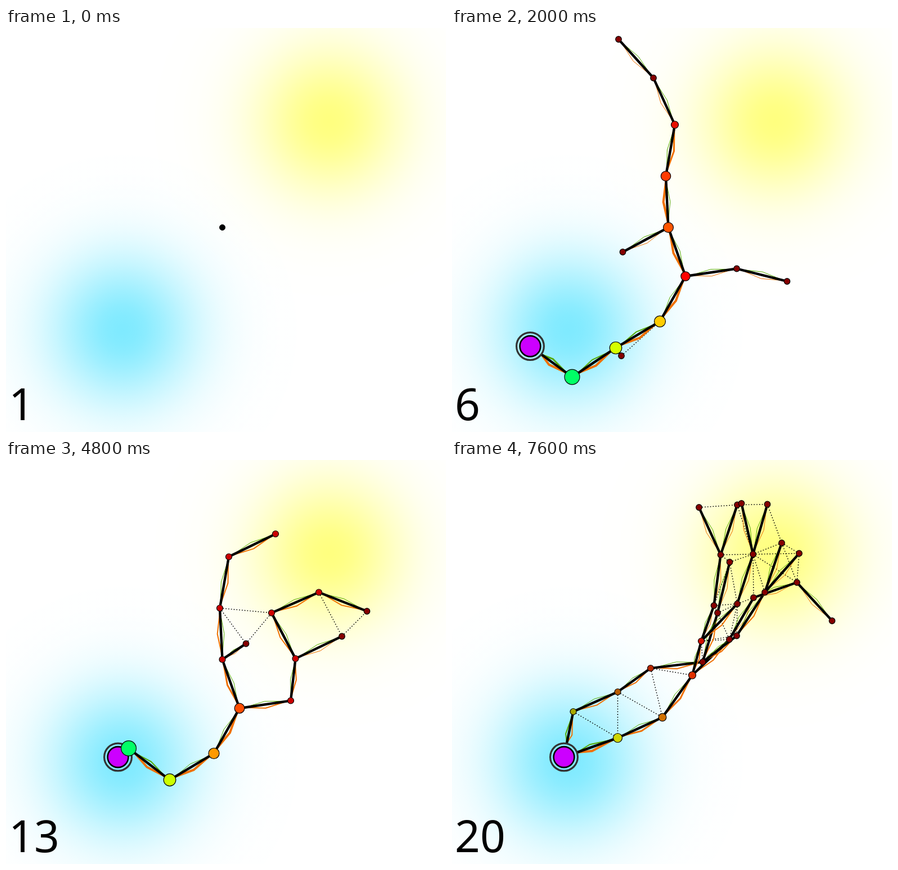
An HTML page with a canvas that plays this animation: 782x716 px, repeating every 8 s.

```html
<!DOCTYPE html>
<html lang="en">
<head>
<meta charset="utf-8">
<title>Growing network</title>
<style>
  html, body { margin: 0; width: 100%; height: 100%; overflow: hidden; background: #fff; }
  canvas { display: block; width: 782px; height: 716px; }
</style>
</head>
<body>
<canvas id="stage" width="782" height="716"></canvas>
<script>
const ctx = document.getElementById('stage').getContext('2d');
const STEP = 400;

const P = {
  a: [384.5, 353.5], b: [415, 440], c: [369.5, 520], d: [291, 567], e: [213.5, 618.5],
  f: [139, 564], g: [199, 526.5], h: [218, 511], i: [301, 581], j: [252, 651],
  k: [380, 262.5], l: [396, 171.5], m: [358, 88.5], n: [296, 20], o: [506, 426.5],
  p: [595.5, 449], q: [303.5, 397], r: [497.5, 400], s: [472, 271], t: [311, 138.5],
  u: [479, 131], v: [514.5, 352], w: [556, 234.5], x: [437, 236], y: [426.5, 325.5],
  z: [515.5, 316.5], A: [597, 312.5], B: [641.5, 268], C: [586, 147], D: [519, 48],
  E: [565, 97], F: [673, 182], H: [614, 59], N: [283, -14],
  G: [215.5, 446], I: [294.5, 411], J: [353, 369], K: [294.5, 492.5], L: [374, 456],
  M: [427, 381.5], O: [445.5, 358], P: [443, 321], Q: [493, 318], R: [506, 311.5],
  S: [465.5, 258], T: [507, 255], U: [536, 244], V: [613, 217], W: [675.5, 285],
  X: [617, 165.5], Y: [535, 167], Z: [493.5, 181],
  α: [477.5, 168], β: [439, 84], γ: [507, 79.5], δ: [514.5, 77], ε: [560.5, 78.5], ζ: [625, 13]
};

// A node style is a hue, or [hue, radius, lightness]; unlisted nodes are small and dark.
const DARK = [0, 5.3, 26], RED = [0, 5.5, 40];

// Links: two nodes, then the orange and green widths.
const base = { d: 72, c: 36, b: 18, h: 144 };
const arm = 'hd42 dc41 cb41 ba31';
const crown = arm + ' ak21 kl21 lu11 bo11 ov11 vA11 AB11 ay31 yx11 ys11 yz31 zw31 wC21';
const mesh = 'kx ks ky lx xs sw sz sv yv zv zA wA wB';
const fork = { ...base, a: [12, 8, 50], y: [5, 6, 43], z: RED, w: RED };
const ring = { ...base, o: RED, v: RED, s: RED, a: RED, k: RED, l: RED, w: RED, u: RED };
const loop = arm + ' ak21 kl21 lu21 bo21 ov21 vs21 sw21';
const bundle = 'gG22 GI21 IJ21 JO21 gK42 KL31 LM31 MP21 MQ21 OR21 Os21 PS11 PT21 sZ11 Sα11 ' +
  'QU11 Rw21 UV11 wC11 wX11 TY11 αβ11 αγ11 Yδ11 Yε11';
const web = 'GK IK IL JL JM PO PQ PR sS sT ST sQ QT TR SZ Zα ZY ZT αY βγ γε γY εC CY CX CV YX XV YU Yw YV TU';
const wide = {
  G: [60, 5.5, 33], I: [30, 5.5, 36], J: [13, 5.5, 36], K: [62, 8, 42],
  L: [32, 6.9, 41], M: [13, 6.5, 44], P: [5, 5.5, 41]
};

const step = (root, nodes, links = '', dots = '') =>
  ({ root, nodes, links: links.split(' ').filter(Boolean), dots: dots.split(' ').filter(Boolean) });

const steps = [
  step('', {}),
  step('b', { a: 144 }, 'ba33'),
  step('c', { b: 144, a: 68 }, 'cb43 ba32'),
  step('d', { c: 144, b: 68, a: 40, k: 16 }, 'dc43 cb42 ba41 ak31'),
  step('e', { d: 144, c: 68, b: 30, a: 20, k: 12, l: [3, 6.5, 45] },
    'ed43 dc42 cb41 ba41 ak41 kl21 lm11 bo11'),
  step('f', { e: 144, d: 70, c: 48, b: 0, a: 20, k: 14, l: [4, 6.5, 45] },
    'fe43 ed42 dc42 cb41 ba41 ak41 kl31 lm11 mn11 aq11 bo11 op11 di11', 'ic'),
  step('g', { e: 192, d: 128, c: 64, b: 16, a: 22, k: 14, l: RED },
    'ge43 ed43 dc42 cb41 ba41 ak41 kl21 lm11 mn11 bo11 op11 ej11', 'jd'),
  step('g', { e: 192, d: 128, c: 62, b: 32, a: 22, k: 14, s: RED },
    'ge43 ed43 dc42 cb41 ba41 ak41 kl21 lm11 mn11 lt11 ks21 br11 bo11 op11 ej11', 'nN tm ro jd'),
  step('g', { e: 192, d: 128, c: 62, b: 32, a: 22, k: 14, s: RED },
    'ge43 ed43 dc42 cb41 ba41 ak41 kl21 lm11 mn11 ks21 bo11 ov11'),
  step('g', ring, arm + ' ak31 kl21 lm11 mn11 lu11 ks21 sw11 bo11 ov11', 'sv'),
  step('g', ring, loop, 'ks'),
  step('g', ring, loop + ' wB11 uD11', 'ks'),
  step('g', ring, loop + ' wB21 vA11 ay11', 'ks ky ys wA AB'),
  step('g', ring, loop + ' wB11 vA11 ay11 yx11 uE11', 'ks kx ky ys xs wA AB'),
  step('g', fork, arm + ' ak21 kl21 lu11 bo21 ov21 vs11 sw21 vA11 AB11 ay21 yx11 yz11',
    'kx ks ky lx xs sz yv zv zA wA wB'),
  step('g', fork, crown, mesh),
  step('g', fork, crown + ' BF11', mesh + ' FC Fw'),
  step('g', fork, crown + ' BF11 CH11', mesh + ' FC Fw'),
  step('g', wide, bundle + ' εζ11', web),
  step('g', wide, bundle + ' VW11', web)
];

function glow(x, y, rgb) {
  const R = 340, grad = ctx.createRadialGradient(x, y, 0, x, y, R);
  for (let i = 0; i <= 40; i++) {
    const d = i / 40 * R;
    grad.addColorStop(i / 40, `rgba(${rgb},${0.5 * Math.exp(-d * d / (2 * 92 * 92))})`);
  }
  ctx.fillStyle = grad;
  ctx.fillRect(0, 0, 782, 716);
}

function stroke(points, color, width, dash = []) {
  ctx.beginPath();
  points.forEach(p => ctx.lineTo(...p));
  ctx.strokeStyle = color;
  ctx.lineWidth = width;
  ctx.setLineDash(dash);
  ctx.stroke();
  ctx.setLineDash([]);
}

function disc([x, y], r, fill, line, width) {
  ctx.beginPath();
  ctx.arc(x, y, r, 0, Math.PI * 2);
  if (fill) { ctx.fillStyle = fill; ctx.fill(); }
  ctx.strokeStyle = line;
  ctx.lineWidth = width;
  ctx.stroke();
}

function look(s, id) {
  const v = s.nodes[id] ?? DARK;
  return Array.isArray(v) ? v : [v, 8.2 + v / 27.5, 50];
}

// The segment between two nodes, cut at their rims.
function span(s, [from, to]) {
  const [x1, y1] = P[from], [x2, y2] = P[to];
  const len = Math.hypot(x2 - x1, y2 - y1);
  const ux = (x2 - x1) / len, uy = (y2 - y1) / len;
  const rim = id => id === s.root ? 25 : look(s, id)[1];
  const r1 = rim(from), r2 = rim(to);
  if (r1 + r2 >= len) return null;
  const side = ux < 0 ? -1 : 1;
  return {
    start: [x1 + ux * r1, y1 + uy * r1],
    end: [x2 - ux * r2, y2 - uy * r2],
    bend: k => [(x1 + x2) / 2 - uy * side * k, (y1 + y2) / 2 + ux * side * k],
    len
  };
}

function drawLink(s, link) {
  const g = span(s, link);
  if (!g) return;
  const k = Math.min(6.6, g.len * 0.075);
  const width = n => n > 1 ? +n : 1;
  stroke([g.start, g.bend(-k * 0.85), g.end], '#55aa00', width(link[3]));
  stroke([g.start, g.bend(k), g.end], '#f07000', width(link[2]));
  stroke([g.start, g.end], '#000', 4.4);
}

function drawNode(s, id) {
  const [hue, r, light] = look(s, id);
  disc(P[id], r, `hsl(${hue},100%,${light}%)`, '#000', 1.2);
}

function draw(index) {
  const s = steps[index];
  ctx.fillStyle = '#fff';
  ctx.fillRect(0, 0, 782, 716);
  glow(207, 535, '0,213,255');
  glow(574, 165, '255,255,0');

  for (const dot of s.dots) {
    const g = span(s, dot);
    if (g) stroke([g.start, g.end], '#000', 1.4, [1.8, 3]);
  }
  s.links.forEach(link => drawLink(s, link));

  if (s.root) {
    disc(P[s.root], 24.4, null, '#333', 3.2);
    disc(P[s.root], 18.4, 'hsl(288,100%,50%)', '#000', 2.6);
  } else {
    disc(P.a, 5, '#000', '#000', 1);
  }
  const ids = new Set(s.links.flatMap(link => [link[0], link[1]]));
  ids.delete(s.root);
  ids.forEach(id => drawNode(s, id));

  ctx.fillStyle = '#000';
  ctx.font = '78.5px "Noto Sans", "Open Sans", sans-serif';
  ctx.fillText(index + 1, 5, 695);
}

let shown = -1;
function tick() {
  const index = Math.floor(performance.now() / STEP) % steps.length;
  if (index !== shown) draw(shown = index);
  requestAnimationFrame(tick);
}
tick();
</script>
</body>
</html>
```
